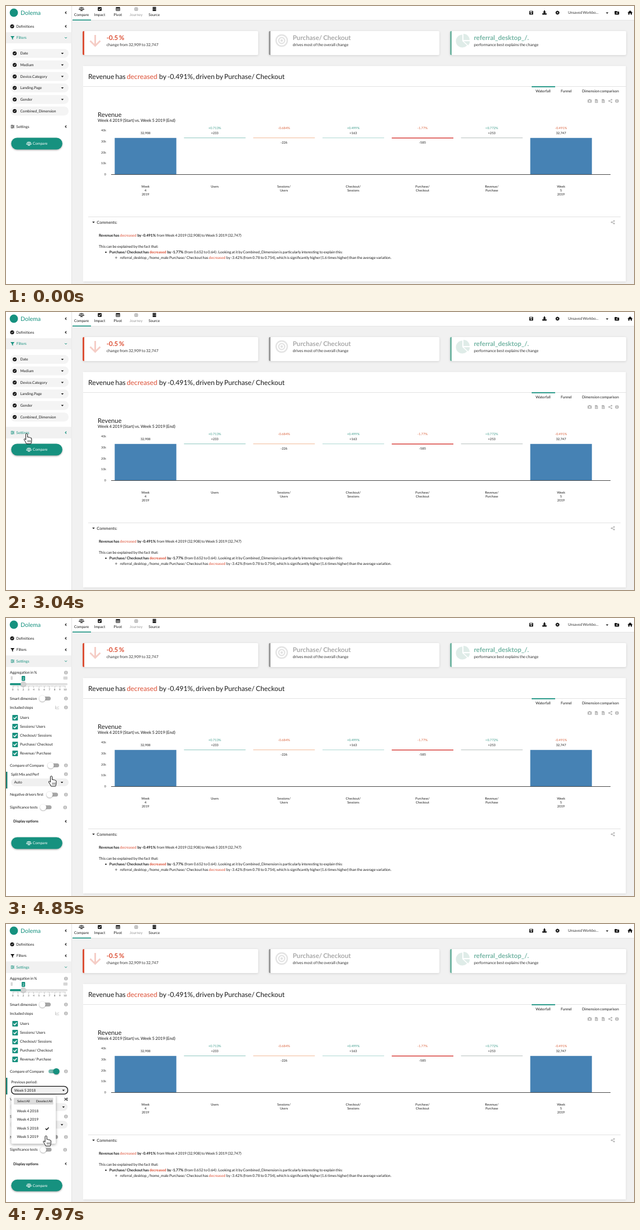
An HTML page with a canvas for the animation above (8000 ms loop, 1123 px wide and 499 px high).

```html
<!DOCTYPE html>
<html lang="en">
<head>
<meta charset="utf-8">
<title>Dashboard</title>
<style>
html, body { margin: 0; width: 100%; height: 100%; overflow: hidden; background: #fff; }
canvas { display: block; width: 1123px; height: 499px; }
</style>
</head>
<body>
<canvas id="stage"></canvas>
<script>
const W = 1123, H = 499, LOOP = 8000;
const INK = '#1c1c1c', TEAL = '#16917f', RED = '#dc4f35', GREY = '#b8b8b8', PALE = '#f1f1f1';
const canvas = document.getElementById('stage'), g = canvas.getContext('2d');
const dpr = window.devicePixelRatio || 1;
canvas.width = W * dpr;
canvas.height = H * dpr;

const clamp = v => Math.max(0, Math.min(1, v));
const ramp = (t, a, b) => { const k = clamp((t - a) / (b - a)); return k * k * (3 - 2 * k); };

// ---- drawing helpers ----
function rect(x, y, w, h, c) { g.fillStyle = c; g.fillRect(x, y, w, h); }
function round(x, y, w, h, r, c) {
  g.fillStyle = c; g.beginPath(); g.roundRect(x, y, w, h, r); g.fill();
}
function disc(x, y, r, c) {
  g.fillStyle = c; g.beginPath(); g.arc(x, y, r, 0, 7); g.fill();
}
function ring(x, y, r, w, c) {
  g.strokeStyle = c; g.lineWidth = w; g.beginPath(); g.arc(x, y, r, 0, 7); g.stroke();
}
function line(c, w, ...p) {
  g.strokeStyle = c; g.lineWidth = w; g.beginPath();
  for (let i = 0; i < p.length; i += 2) g.lineTo(p[i], p[i + 1]);
  g.stroke();
}
function poly(c, ...p) {
  g.fillStyle = c; g.beginPath();
  for (let i = 0; i < p.length; i += 2) g.lineTo(p[i], p[i + 1]);
  g.fill();
}
function shaded(blur, dy, alpha, draw) {
  g.save();
  g.shadowColor = `rgba(0,0,0,${alpha})`;
  g.shadowBlur = blur * dpr;
  g.shadowOffsetY = dy * dpr;
  draw();
  g.restore();
}
// y is the middle of the capitals; word gaps are slightly tight
function text(s, x, y, c = INK, size = 6.65, weight = 400, align = 'left') {
  g.font = `${weight} ${size}px Lato, "Open Sans", sans-serif`;
  g.wordSpacing = `${-0.08 * size}px`;
  g.textAlign = align;
  g.fillStyle = c;
  g.fillText(s, x, y + size * 0.36);
  return x + g.measureText(s).width;
}
function runs(x, y, size, ...parts) {
  for (const [s, c = INK, w = 400] of parts) x = text(s, x, y, c, size, w);
}

// ---- icons ----
function tick(x, y, s, c, w) { line(c, w, x - s, y, x - s * .25, y + s * .7, x + s, y - s * .7); }
function checkDot(x, y) { disc(x, y, 3.5, '#111'); tick(x, y, 1.7, '#fff', 1); }
function info(x, y) {
  disc(x, y, 3.3, '#bcbcbc');
  rect(x - .5, y - .5, 1, 2.4, '#fff');
  rect(x - .5, y - 2, 1, 1, '#fff');
}
function caret(x, y, c = '#111') { poly(c, x - 2.3, y - 1, x + 2.3, y - 1, x, y + 1.5); }
function chevron(x, y, open, c) {
  if (open) line(c, 1, x - 1.9, y - 1, x, y + 1, x + 1.9, y - 1);
  else line(c, 1.1, x + 1, y - 2, x - 1, y, x + 1, y + 2);
}
function scales(x, y, c) {
  line(c, 1, x, y - 3.5, x, y + 3);
  line(c, .9, x - 3.2, y - 2.4, x + 3.2, y - 2.4);
  rect(x - 2.2, y + 2.5, 4.4, 1.1, c);
  for (const d of [-2.9, 2.9]) {
    line(c, .6, x + d - 1.6, y + .7, x + d, y - 2.2, x + d + 1.6, y + .7);
    rect(x + d - 1.8, y + .4, 3.6, 1.2, c);
  }
}
function sliders(x, y, c) {
  for (let i = -1; i < 2; i++) {
    rect(x - 3.3, y + i * 2.2 - .4, 6.6, .8, c);
    rect(x + (i ? -1.5 : 1), y + i * 2.2 - .9, 1.2, 1.8, c);
  }
}
function share(x, y) {
  line(GREY, 1, x + 2.3, y - 2.3, x - 2, y, x + 2.3, y + 2.3);
  for (const [a, b] of [[2.3, -2.3], [-2, 0], [2.3, 2.3]]) disc(x + a, y + b, 1.4, GREY);
}
function shuffle(x, y) {
  for (const s of [-1, 1]) {
    line('#111', 1, x - 3, y - 1.6 * s, x - 1.3, y - 1.6 * s, x + 1, y + 1.6 * s, x + 2, y + 1.6 * s);
    poly('#111', x + 1.6, y + 1.6 * s - 1.4, x + 3.5, y + 1.6 * s, x + 1.6, y + 1.6 * s + 1.4);
  }
}
function toggle(x, y, k) {
  round(x - 4, y - 3.5, 19, 7, 3.5, k > .5 ? '#74b9af' : '#a6a6a6');
  shaded(2, .7, .4, () => disc(x + 10 * k, y, 5.6, k > .5 ? TEAL : '#fff'));
}
function select(s, x, y, caretX, focus) {
  round(x, y - 7, 103, 14, 7, '#f0f0f0');
  if (focus) {
    g.strokeStyle = '#111'; g.lineWidth = 1.3;
    g.beginPath(); g.roundRect(x + .4, y - 7, 100.8, 14, 6.5); g.stroke();
  }
  text(s, x + 5.5, y);
  caret(caretX, y);
}

// ---- fixed parts ----
function header() {
  rect(0, 0, W, 26, '#fff');
  rect(118, 25, W, 1, '#e4e4e4');
  disc(14, 12, 7.4, TEAL);
  text('Dolema', 26, 12, TEAL, 10.6);
  chevron(107, 12, false, '#111');
  const names = ['Compare', 'Impact', 'Pivot', 'Journey', 'Source'];
  names.forEach((s, i) => text(s, 135 + i * 32.5, 16, i == 3 ? '#999' : INK, 6.65, 400, 'center'));
  rect(119, 24.4, 33, 1.6, TEAL);
  scales(135, 5.3, '#111');
  round(164.2, 2, 6.8, 6.8, 1, '#111');
  tick(167.6, 5.4, 2, '#fff', 1.1);
  round(196.5, 2, 7.4, 6.8, .8, '#111');
  for (const x of [197.6, 200.7]) for (const y of [4.2, 6.5]) rect(x, y, 2.2, 1.4, '#fff');
  disc(232.8, 5.4, 3.5, '#aaa');
  g.strokeStyle = '#fff'; g.lineWidth = .5;
  g.beginPath(); g.ellipse(232.8, 5.4, 1.5, 3.5, 0, 0, 7); g.stroke();
  line('#fff', .5, 229, 5.4, 237, 5.4);
  for (let i = 0; i < 3; i++) round(262, 1.7 + i * 2.6, 6.6, 2.1, 1, '#111');

  round(935.8, 8.8, 6.8, 6.6, .9, '#111');
  rect(937, 9.6, 3.8, 1.7, '#fff');
  disc(939.2, 13.4, 1.1, '#fff');
  rect(961.8, 8, 2.2, 3, '#111');
  poly('#111', 959.8, 10.6, 966, 10.6, 962.9, 13.7);
  round(959, 13, 7.8, 2.6, .7, '#111');
  for (let i = 0; i < 4; i++) {
    const a = i * Math.PI / 4, c = 3.6 * Math.cos(a), s = 3.6 * Math.sin(a);
    line('#111', 1.6, 986.2 - c, 12 - s, 986.2 + c, 12 + s);
  }
  disc(986.2, 12, 2.7, '#111');
  disc(986.2, 12, 1.1, '#fff');
  text('Unsaved Workbo...', 1005, 12, '#333');
  caret(1075, 12.5);
  round(1088.4, 9, 4, 3, .8, '#111');
  round(1088.4, 9.9, 8, 5.5, .8, '#111');
  line('#fff', .8, 1091, 12.6, 1094, 12.6);
  line('#fff', .8, 1092.5, 11.1, 1092.5, 14.1);
  poly('#111', 1111.4, 12.2, 1116, 8, 1120.6, 12.2, 1119.2, 12.2, 1119.2, 15.6, 1117, 15.6,
    1117, 13, 1115, 13, 1115, 15.6, 1112.8, 15.6, 1112.8, 12.2);
}

function card(x, w, c, head, headColor, sub) {
  shaded(4, 1, .13, () => round(x, 45, w, 43, 2, '#fff'));
  round(x, 45, 3, 43, [2, 0, 0, 2], c);
  text(head, x + 42.7, 57, headColor, 11.6, 700);
  text(sub, x + 42.7, 69.3, '#333', 7.1);
}

function cards() {
  card(137, 314, RED, '-0.5 %', RED, 'change from 32,909 to 32,747');
  line('#f5cdc6', 3, 159.5, 52, 159.5, 71);
  line('#f5cdc6', 3, 150.5, 62.5, 159.5, 71.5, 168.5, 62.5);
  card(470, 305, '#999', 'Purchase/ Checkout', '#a9a9a9', 'drives most of the overall change');
  ring(493, 62, 10, 2.4, '#e3e3e3');
  ring(493, 62, 5.4, 2.2, '#e3e3e3');
  disc(493, 62, 2.3, '#e3e3e3');
  card(794, 315, '#71b5a3', 'referral_desktop_/.', '#74b5a4', 'performance best explains the change');
  g.fillStyle = '#dfece8';
  for (const [x, y, r, a, b] of [[816, 63, 11.5, .75, 4.71], [818, 61, 11, -1.57, 0], [818.5, 63.2, 11, 0, .75]]) {
    g.beginPath(); g.moveTo(x, y); g.arc(x, y, r, a, b); g.fill();
  }
}

function chart() {
  text('Revenue', 164, 195, INK, 11.25);
  text('Week 4 2019 (Start) vs. Week 5 2019 (End)', 164, 205.5, INK, 7.6);
  for (let i = 0; i < 5; i++) text(i ? i * 10 + 'k' : '0', 179, 302.4 - i * 19.85, '#333', 5.4, 400, 'right');
  const cols = [
    ['Week|4|2019', '', '32,908', '#4682b4'],
    ['Users', '+0.713%', '+233', '#8cc6bf'],
    ['Sessions/|Users', '-0.684%', '-226', '#f2b795'],
    ['Checkout/|Sessions', '+0.499%', '+163', '#abd6d1'],
    ['Purchase/|Checkout', '-1.77%', '-585', '#d73c38'],
    ['Revenue/|Purchase', '+0.772%', '+253', '#b4bcbb'],
    ['Week|5|2019', '-0.491%', '32,747', '#4682b4']
  ];
  cols.forEach(([label, pct, val, c], i) => {
    const x = 249.4 + i * 123.85, down = val[0] == '-';
    if (i % 6 == 0) rect(x - 55, 236.8, 110.2, 65.7, c);
    else rect(x - 55, 236.2, 110.2, i == 4 ? 1.5 : 1, c);
    label.split('|').forEach((s, n) => text(s, x, 324 + n * 7, INK, 5.75, 400, 'center'));
    text(pct, x, 219, pct[0] == '+' ? '#3f9c8c' : '#d9623c', 5.75, 400, 'center');
    text(val, x, down ? 244.7 : 227.5, INK, 5.75, 400, 'center');
  });
  rect(188, 302, 893, 1, '#444');
}

function panel() {
  shaded(3, .5, .14, () => rect(137.5, 107.5, 971, 387, '#fff'));
  runs(147, 127, 12.27, ['Revenue has '], ['decreased', RED], [' by -0.491%, driven by Purchase/ Checkout']);
  rect(138, 144, 971, .9, '#e0e0e0');
  rect(940, 144, 42, 1.8, TEAL);
  text('Waterfall', 947, 152.5);
  text('Funnel', 992, 152.5);
  text('Dimension comparison', 1030, 152.5);
  round(1040, 168, 7.4, 5.4, 1, GREY);
  rect(1042, 167, 3.2, 2, GREY);
  disc(1043.7, 170.7, 1.4, '#fff');
  for (const x of [1053.2, 1065.4]) {
    poly(GREY, x, 167, x + 3.4, 167, x + 5.2, 169, x + 5.2, 174, x, 174);
    rect(x + 1.2, 170.4, 2.8, .7, '#fff');
    rect(x + 1.2, 171.9, 2.8, .7, '#fff');
  }
  share(1080.5, 170.5);
  info(1092.5, 170.5);
  chart();
  rect(147, 378, 952, .9, '#dedede');
  caret(156.5, 388);
  text('Comments:', 162.3, 388, INK, 7.35);
  share(1085, 388.2);
  runs(166, 411.6, 6.65, ['Revenue has ', INK, 700], ['decreased', RED], [' by -0.491%', INK, 700],
    [' from Week 4 2019 (32,908) to Week 5 2019 (32,747)']);
  text('This can be explained by the fact that:', 166, 431.8);
  disc(178.6, 442, 1.2, '#111');
  runs(184.8, 441.8, 6.65, ['Purchase/ Checkout has ', INK, 700], ['decreased', RED, 700], [' by -1.77%', INK, 700],
    [' (from 0.652 to 0.64) . Looking at it by Combined_Dimension is particularly interesting to explain this:']);
  ring(197, 451.7, 1.2, .6, '#111');
  runs(204, 451.6, 6.65, ['referral_desktop_/home_male Purchase/ Checkout has '], ['decreased', RED],
    [' by -3.42% (from 0.78 to 0.754), which is significantly higher (1.6 times higher) than the average variation.']);
}

// ---- pointer ----
const PATH = [
  [1250, 813, 462], [1320, 700, 430], [1390, 520, 380], [1460, 330, 325], [1530, 190, 285],
  [1600, 110, 262], [1700, 76, 249], [1870, 70.5, 247], [2010, 63, 238], [2400, 41, 203],
  [2780, 37, 218], [3600, 37, 218], [3800, 39, 224], [4080, 48, 261], [4400, 66, 271],
  [4800, 80, 286], [5150, 87, 268], [5270, 87, 265], [6280, 87, 265], [6500, 82, 285],
  [6740, 75, 316], [6840, 74, 303], [7060, 73, 296], [7280, 73, 296], [7550, 72, 325],
  [7780, 71, 370], [7970, 71.5, 380]
];
function pointer(t) {
  const n = PATH.findIndex(p => p[0] > t);
  if (n < 1) return n ? PATH[PATH.length - 1].slice(1) : PATH[0].slice(1);
  const [a, x, y] = PATH[n - 1], [b, u, v] = PATH[n], k = (t - a) / (b - a);
  return [x + (u - x) * k, y + (v - y) * k];
}
// share of the last moments spent between two heights
function hover(t, top, bottom) {
  let k = 0;
  for (let d = 30; d <= 120; d += 30) {
    const y = pointer(t - d)[1];
    if (y >= top && y < bottom) k += .25;
  }
  return k;
}
const HAND = new Path2D('M-1.6 1.2Q0-1 1.6 1.2V6.8Q3 5.8 4.2 7.3Q5.6 6.3 6.6 8Q8.2 7.3 8.8 9V13.5Q8.6 16 7.6 18.5H-.6Q-1.5 15.5-4.6 11.4Q-5 9.5-3.6 9.5L-1.6 11.3Z');
const ARROW = new Path2D('M0 0V14L3.3 11L5.6 16L8 15L5.8 10.2H10Z');
function drawPointer(t) {
  if (t < 1250) return;
  const arrow = t < 1690 || (t > 3760 && t < 4700) || (t > 6400 && t < 6600);
  const shape = arrow ? ARROW : HAND;
  g.save();
  g.translate(...pointer(t));
  g.lineJoin = 'round';
  g.fillStyle = '#fff'; g.fill(shape);
  g.strokeStyle = '#111'; g.lineWidth = 1; g.stroke(shape);
  if (!arrow) for (const x of [2.2, 4.4, 6.6]) line('#111', .7, x, 12, x, 16);
  g.restore();
}

// ---- sidebar ----
function clipped(top, height, draw) {
  if (height < .5) return;
  g.save();
  g.beginPath(); g.rect(0, top, 118, height); g.clip();
  draw();
  g.restore();
}

function filterList() {
  ['Date', 'Medium', 'Device.Category', 'Landing.Page', 'Gender', 'Combined_Dimension'].forEach((s, i) => {
    const y = 85 + i * 20.7;
    round(8, y - 8, 104, 16, 8, '#f4f4f4');
    checkDot(15.5, y);
    text(s, 25.5, y);
    if (i < 5) caret(100.8, y);
  });
}

function mark(k, top, bottom) { if (k) rect(0, top, 2.4 * k, bottom - top, '#147c6d'); }

function settingsList(t) {
  const open = t >= 5470, live = t > 3700, dy = open ? 65.3 : 0;
  const over = (a, b) => live && t < 7190 ? hover(t, a, b) : 0;
  text('Aggregation in %', 7, 98);
  info(107.2, 98);
  round(8.5, 104.5, 3.4, 6.4, 1, '#d6d6d6');
  round(102.5, 105, 7.5, 5.6, 1, '#d6d6d6');
  round(28, 104, 6.2, 8.8, 1, TEAL);
  text('2', 31.1, 108.5, '#fff', 6, 400, 'center');
  round(7, 117, 103, 3.4, 1.5, '#dedede');
  round(7, 117, 24, 3.4, 1.5, TEAL);
  for (let i = 0; i <= 40; i++) rect(12 + i * 2.34, 121.4, .5, i % 4 ? 1.8 : 3.6, '#777');
  for (let i = 0; i < 11; i++) text(i, 12.2 + i * 9.35, 128, '#444', 4.6, 400, 'center');
  shaded(1.5, .5, .3, () => disc(31, 118.5, 4.7, '#d2d2d2'));
  text('Smart dimension', 7, 144.5);
  toggle(65, 144.5, 0);
  info(107.2, 144.5);
  text('Included steps', 7, 160.5);
  line(GREY, .8, 88.5, 157.5, 88.5, 163, 95, 163);
  line(GREY, .8, 89.5, 161.5, 91, 159.5, 92.5, 161, 94.5, 158.5);
  info(107.2, 160.5);
  ['Users', 'Sessions/ Users', 'Checkout/ Sessions', 'Purchase/ Checkout', 'Revenue/ Purchase'].forEach((s, i) => {
    const y = 179 + i * 16;
    round(11.3, y - 5, 10, 10, 1, TEAL);
    tick(16.3, y, 3, '#fff', 1.5);
    text(s, 25, y);
  });

  const cmp = over(253, 276);
  mark(cmp, 253, 276);
  text('Compare of Compare', 7 + 2.3 * cmp, 264.5);
  toggle(80, 264.5, ramp(t, 5560, 5800));
  info(107.2, 264.5);

  if (open) {
    const list = t >= 7190, prev = list ? 1 : over(276, 306), vs = over(306, 336);
    mark(prev, 276, 306);
    mark(vs, 307, 336);
    text('Previous period:', 7 + 2.3 * prev, 284);
    select('Week 5 2018', 7 + 2.2 * prev, 298.4, 102.8, list);
    text('Vs.', 7 + 2 * vs, 314.5);
    shuffle(107.2, 314.5);
    select('Week 4 2018', 7 + 2 * vs, 328.5, 102.8);
  }
  const split = open ? 0 : over(276, 306);
  mark(split, 276, 306);
  text('Split Mix and Perf', 7 + 2 * split, 280.3 + dy);
  info(107.2, 280.3 + dy);
  select('Auto', 7 + 2 * split, 295 + dy, 100);
  text('Negative drivers first', 7, 317 + dy);
  toggle(78, 317 + dy, 0);
  info(107.2, 317 + dy);
  text('Significance tests', 7, 339.8 + dy);
  toggle(66.5, 339.8 + dy, 0);
  info(105.7, 340 + dy);
  text('Display options', 13, 365 + dy, INK, 6.65, 700);
  chevron(107, 365 + dy, false, '#111');
}

function dropdown() {
  shaded(5, 1.5, .35, () => round(9.5, 307.5, 79.5, 87, 2, '#fff'));
  round(14, 312, 70.5, 12, 1, '#dcdcdc');
  text('Select All', 20, 318, INK, 5.7);
  text('Deselect All', 53.7, 318, INK, 5.7);
  ['Week 4 2018', 'Week 4 2019', 'Week 5 2018', 'Week 5 2019'].forEach((s, i) => text(s, 19.5, 335.2 + i * 15.6));
  tick(73.5, 367.2, 2.9, '#111', 1.5);
}

function button(y, hot) {
  shaded(3, 1.2, .35, () => round(9.3, y - 10.5, 91.5, 21, 10.5, hot ? '#128270' : TEAL));
  scales(41, y, '#fff');
  text('Compare', 47.8, y, '#fff');
}

function sidebar(t) {
  const p = ramp(t, 3100, 3450), row = 216.5 - 139 * p;
  rect(0, 26, 118, H, '#fff');
  rect(117, 0, 1, H, '#e2e2e2');
  checkDot(11, 36.5);
  text('Definitions', 18.3, 36.5);
  chevron(107, 36.5, false, '#111');

  const shut = p > .02, c = shut ? '#111' : TEAL;
  if (!shut) rect(0, 47, 117.5, 20, PALE);
  poly(c, 8, 54, 15.2, 54, 12.5, 57.2, 12.5, 60.6, 10.7, 59.3, 10.7, 57.2);
  text('Filters', 18.7, 57, c);
  chevron(107, 57, !shut, c);
  clipped(67, 139 * (1 - p), filterList);

  const lit = ramp(t, 2180, 2320), on = lit > .5 ? TEAL : INK;
  g.globalAlpha = lit;
  rect(0, row - 10.3, 117.5, 20.6, PALE);
  g.globalAlpha = 1;
  sliders(11.7, row, on);
  text('Settings', 18.3, row, on);
  chevron(107, row, shut, on);
  clipped(row + 10.3, (t >= 5470 ? 362 : 296) * p, () => {
    g.translate(0, row - 77.5);
    settingsList(t);
  });

  const hot = t > 1660 && t < 2040;
  button(row + 30.5 + 296 * p + (t >= 5470 ? 65.3 : 0), hot);
  if (hot && t > 1720) {
    rect(27.5, 225.8, 50.5, 10, '#ececec');
    text('shortcut: enter', 29.6, 230.5);
  }
  if (t >= 7190) dropdown();
}

function draw(t) {
  g.setTransform(dpr, 0, 0, dpr, 0, 0);
  if ('textRendering' in g) g.textRendering = 'geometricPrecision';
  rect(0, 0, W, H, PALE);
  header();
  cards();
  panel();
  sidebar(t);
  drawPointer(t);
}

let start;
function tickFrame(now) {
  start ??= now;
  draw((now - start) % LOOP);
  requestAnimationFrame(tickFrame);
}
draw(0);
requestAnimationFrame(tickFrame);
</script>
</body>
</html>
```
